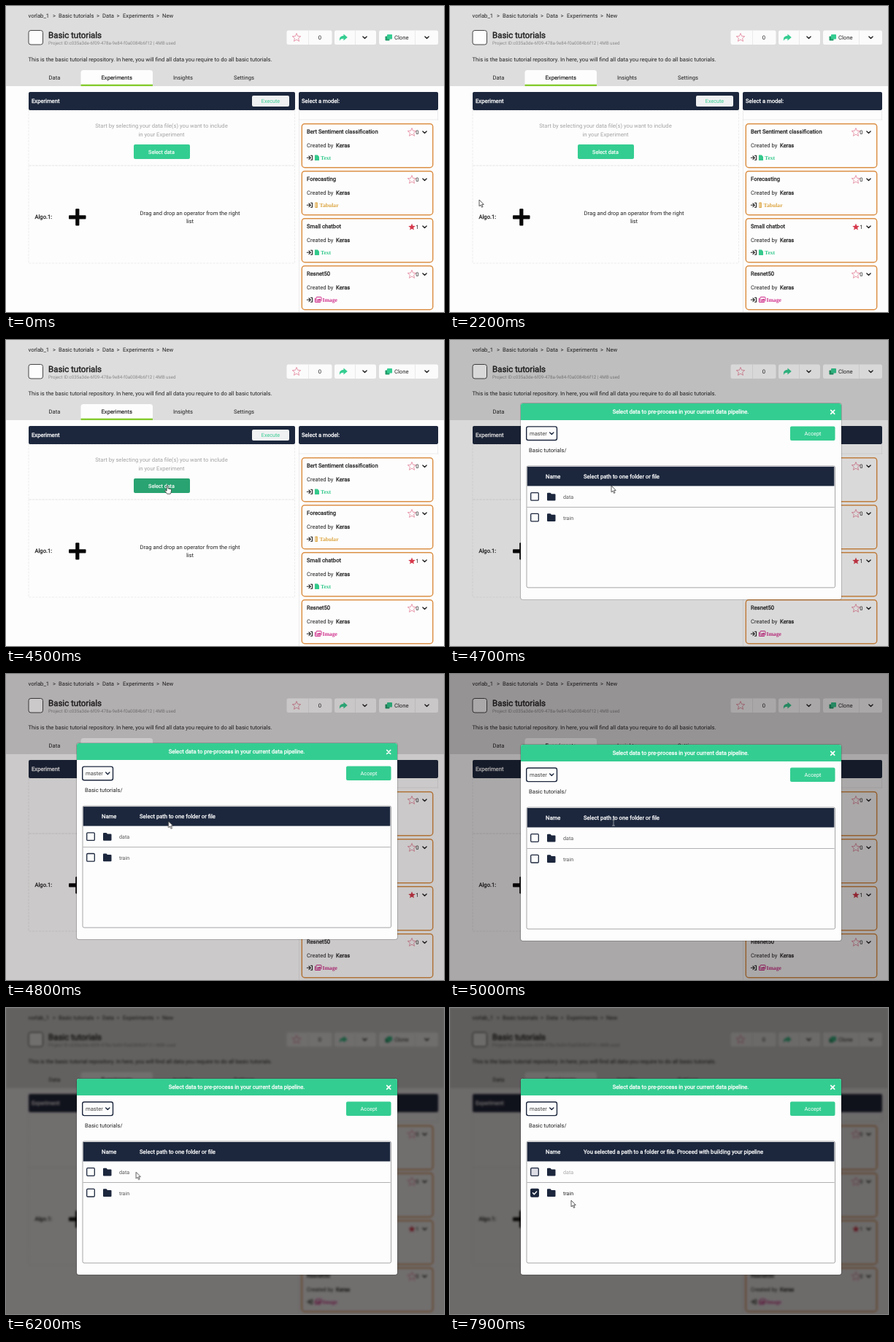
An HTML page for the animation above (8000 ms loop, 600 px wide and 420 px high).

```html
<!DOCTYPE html>
<html lang="en">
<head>
<meta charset="utf-8">
<title>Select data for an experiment</title>
<style>
  html, body { margin: 0; width: 100%; height: 100%; overflow: hidden; background: #fdfdfd; }
  svg { position: absolute; left: 0; top: 0; width: 600px; height: 420px; }
  text { font-family: Roboto, sans-serif; text-rendering: geometricPrecision; }
  .tag { font-family: "Liberation Serif", serif; font-weight: bold; }
  #page, #shade, #modal, #cursor, .slide, .glyph, .before, .after, #select {
    animation: 8s linear infinite;
  }
  #page { animation-name: soften; }
  #shade { animation-name: shade; }
  #modal { animation-name: fade; }
  .slide { animation-name: slide; }
  #select { animation-name: hover; }
  #cursor { animation-name: travel; }
  .glyph, .before, .after { animation-timing-function: step-end; }
  .arrow { animation-name: arrow; }
  .hand { animation-name: hand; }
  .beam { animation-name: beam; }
  .before { animation-name: before; }
  .after { animation-name: after; }

  @keyframes soften {
    0%, 61% { filter: blur(0); }
    65% { filter: blur(.4px); }
    73% { filter: blur(1.2px); }
    90%, 100% { filter: blur(1.7px); }
  }
  @keyframes shade {
    0%, 57% { opacity: 0; }
    58.75% { opacity: .14; }
    62.5% { opacity: .34; }
    65% { opacity: .43; }
    72.5% { opacity: .57; }
    100% { opacity: .59; }
  }
  @keyframes fade { 0%, 57% { opacity: 0; } 58.6%, 100% { opacity: 1; } }
  @keyframes slide {
    0%, 57.2% { transform: translateY(-26px); animation-timing-function: ease-out; }
    60.8%, 100% { transform: none; }
  }
  @keyframes hover { 0%, 35% { fill: #34cd91; } 38.5%, 100% { fill: #29a371; } }
  @keyframes travel {
    0%, 27.5% { transform: translate(40px, 266px); animation-timing-function: ease-in-out; }
    31.2%, 58.75% { transform: translate(221px, 200px); }
    61.25%, 73.75% { transform: translate(224px, 204px); animation-timing-function: ease-in-out; }
    82%, 88.75% { transform: translate(116px, 254px); animation-timing-function: ease-in-out; }
    96%, 100% { transform: translate(166px, 264px); }
  }
  @keyframes arrow {
    0% { visibility: hidden; }
    27.5% { visibility: visible; }
    30.6% { visibility: hidden; }
    57.3% { visibility: visible; }
    61.2% { visibility: hidden; }
    74% { visibility: visible; }
    81.4% { visibility: hidden; }
    89.6%, 100% { visibility: visible; }
  }
  @keyframes hand {
    0% { visibility: hidden; }
    30.6% { visibility: visible; }
    57.3% { visibility: hidden; }
    81.4% { visibility: visible; }
    89.6%, 100% { visibility: hidden; }
  }
  @keyframes beam {
    0% { visibility: hidden; }
    61.2% { visibility: visible; }
    74%, 100% { visibility: hidden; }
  }
  @keyframes before { 0% { visibility: visible; } 87.5%, 100% { visibility: hidden; } }
  @keyframes after { 0% { visibility: hidden; } 87.5%, 100% { visibility: visible; } }
</style>
</head>
<body>
<svg id="page" viewBox="0 0 600 420"></svg>
<svg id="over" viewBox="0 0 600 420"></svg>
<script>
const NAVY = '#1c273d', GREEN = '#34cd91', INK = '#222', BASE = 7.65;

const rect = (x, y, w, h, fill, r = 0, extra = '') =>
  `<rect x="${x}" y="${y}" width="${w}" height="${h}" rx="${r}" fill="${fill}" ${extra}/>`;
const path = (d, fill, extra = '') => `<path d="${d}" fill="${fill}" ${extra}/>`;
const line = (d, color, width) =>
  path(d, 'none', `stroke="${color}" stroke-width="${width}" stroke-linecap="round" stroke-linejoin="round"`);

// y is the middle of the capitals
function text(x, y, str, { size = BASE, color = INK, bold = 0, anchor = 'start', cls = '' } = {}) {
  const weight = bold ? `stroke="${color}" stroke-width="${bold}"` : '';
  return `<text x="${x}" y="${(y + size * .355).toFixed(2)}" font-size="${size}" fill="${color}" ` +
    `text-anchor="${anchor}" class="${cls}" ${weight}>${str}</text>`;
}
const bold = (x, y, str, color = INK, more = {}) => text(x, y, str, { color, bold: .3, ...more });
const chevron = (x, y, color = INK) => line(`M${x - 2.6} ${y - 1.3}l2.6 2.6l2.6 -2.6`, color, 1.4);

function star(x, y, r, full) {
  const points = Array.from({ length: 10 }, (_, i) => {
    const a = Math.PI * (i / 5 - .5), d = i % 2 ? r * .45 : r;
    return `${(x + d * Math.cos(a)).toFixed(2)} ${(y + d * Math.sin(a)).toFixed(2)}`;
  });
  const d = `M${points.join('L')}Z`;
  return full ? path(d, '#d63a4c') : path(d, 'none', 'stroke="#e27f97" stroke-width=".8" stroke-linejoin="round"');
}

function header() {
  const crumbs = [[30.5, 'vorlab_1'], [64, '&gt;'], [72, 'Basic tutorials'], [124, '&gt;'], [132, 'Data'],
    [151.5, '&gt;'], [160, 'Experiments'], [206, '&gt;'], [214, 'New']];
  const tabs = [[58.5, 'Data'], [229, 'Insights'], [312, 'Settings']];
  return rect(0, 0, 600, 110, '#dddddd') +
    crumbs.map(([x, s]) => text(x, 13.3, s)).join('') +
    rect(31, 33.5, 19.5, 19.5, '#fdfdfd', 3, 'stroke="#333" stroke-width=".9"') +
    bold(58, 40.3, 'Basic tutorials', INK, { size: 11.5, bold: .45 }) +
    text(58, 51, 'Project ID:c035a3de-6f09-478a-9e84-f0a0084b6f12 | 4MB used', { size: 6.22, color: '#888' }) +
    text(30.5, 73.3, 'This is the basic tutorial repository. In here, you will find all data you require to do all basic tutorials.') +
    [[384.5, 62, 414], [450, 57, 478], [511, 81, 560]].map(([x, w, cut]) =>
      rect(x, 33.5, w, 19.5, '#fbfbfb', 2.5) + rect(cut, 33.5, .8, 19.5, '#e6e6e6')).join('') +
    star(398, 43.5, 6, false) + text(430, 43.3, '0', { anchor: 'middle' }) +
    path('M457 48c-.6-5 1.4-7 5.4-7v-2.4l5.4 4.4l-5.4 4.4v-2.7c-3.2 0-4.6 .8-5.4 3.3z', GREEN) + chevron(491.5, 43.3) +
    rect(519.5, 41.5, 6, 6, '#229b6a', .8) + rect(522, 39, 7, 6.5, GREEN, .8) +
    text(532, 43.3, 'Clone') + chevron(576.5, 43.3) +
    path('M102.500 110V91.500q0-3.500 3.500-3.500h91.500q3.500 0 3.500 3.500V110z', '#fdfdfd') +
    rect(102.5, 107.6, 98.5, 2.4, '#86cb2f') +
    bold(130.5, 97.8, 'Experiments', INK, { bold: .18 }) +
    tabs.map(([x, s]) => text(x, 98.3, s)).join('');
}

function experiment() {
  const dashed = 'stroke="#e9e9ea" stroke-width=".8" stroke-dasharray="3 1.500"';
  const grey = { anchor: 'middle', color: '#a3a3a3' };
  const mid = { anchor: 'middle' };
  return rect(31, 143, 364.5, 76, 'none', 0, dashed) + rect(31, 219, 364.5, 134, 'none', 0, dashed) +
    rect(31, 118, 365, 25, NAVY, 2) + bold(35, 130.3, 'Experiment', '#fff') +
    rect(337, 123, 51, 15, '#eff1f2', 2) + text(362.5, 130.5, 'Execute', { size: 7.2, color: GREEN, anchor: 'middle' }) +
    text(213, 164.6, 'Start by selecting your data file(s) you want to include', grey) +
    text(213, 176, 'in your Experiment', grey) +
    rect(175, 190, 77, 20, GREEN, 2, 'id="select"') +
    bold(213, 200, 'Select data', '#fff', { size: 7.2, anchor: 'middle', bold: .2 }) +
    bold(39.5, 289.6, 'Algo.1:') +
    rect(86, 287.3, 23.5, 5.2, '#080808', 1) + rect(95.2, 278.3, 5.2, 23.3, '#080808', 1) +
    text(252, 284, 'Drag and drop an operator from the right', mid) + text(252, 295.6, 'list', mid);
}

const tags = {
  Text: { color: '#34c98c', x: 431, icon: path('M423 204.500h3.800l2.200 2.200v5.300h-6z', '#34c98c') },
  Tabular: {
    color: '#dca540', x: 429.5,
    icon: rect(423.4, 204.5, 3.4, 7.5, '#dca540', .5) + rect(424.5, 205.5, .8, 5.5, '#fff')
  },
  Image: {
    color: '#cf2f8b', x: 433.5,
    icon: line('M423.500 206.500v5h7', '#cf2f8b', 1) + rect(425, 204.5, 7, 5.5, 'none', .6, 'stroke="#cf2f8b"') +
      path('M426 209l1.500-2l1 1l1.300-1.800l1.700 2.800z', '#cf2f8b')
  }
};

function card([name, kind, liked], i) {
  const tag = tags[kind];
  return `<g transform="translate(0 ${i * 65})">` +
    rect(405.3, 161.7, 179.4, 60, '#fdfdfd', 4, 'stroke="#dc9148" stroke-width="1.500"') +
    bold(412, 172, name, INK, { bold: .28 }) +
    star(556, 173.5, liked ? 5 : 6, liked) + text(561.3, 173.2, liked ? 1 : 0) + chevron(573.5, 173.2) +
    text(412, 191, 'Created by') + bold(452, 191, 'Keras') +
    line('M412.300 208.300h4.500M415 206l2.300 2.300l-2.300 2.300M417.500 205.300h2v6h-2', INK, 1.1) +
    tag.icon + text(tag.x, 208.5, kind, { color: tag.color, cls: 'tag' }) + '</g>';
}

function models() {
  const list = [['Bert Sentiment classification', 'Text', false], ['Forecasting', 'Tabular', false],
    ['Small chatbot', 'Text', true], ['Resnet50', 'Image', false]];
  return rect(401, 118, 191, 25, NAVY, 2) + bold(405, 130.3, 'Select a model:', '#fff') +
    line('M401.500 143V420M591.500 143V156M401 156H592', '#e8e8ea', .8) + list.map(card).join('');
}

const box = (y, fill) => rect(110.7, y - 5.3, 10.6, 10.6, fill, 1.2, `stroke="${NAVY}" stroke-width="1.300"`);
const folder = y => path(`M133 ${y - 4.5}q0-1 1-1h3.500l1.500 1.600h4.500q1 0 1 1v7.200q0 1-1 1h-9.500q-1 0-1-1z`, NAVY);
const label = (y, s, color) => text(155, y + .3, s, { size: 7.15, color });
const group = (cls, ...parts) => `<g class="${cls}">${parts.join('')}</g>`;

function modal() {
  return '<g id="modal">' + group('slide',
    rect(96, 96, 441, 271, '#000', 4, 'opacity=".18"'),
    rect(97, 97, 439, 269, '#fdfdfd', 3),
    path('M97 120V100q0-3 3-3h433q3 0 3 3v20z', GREEN),
    bold(316, 108.5, 'Select data to pre-process in your current data pipeline.', '#fff', { anchor: 'middle' }),
    line('M521.700 106.400l5 5M526.700 106.400l-5 5', '#fff', 1.7),
    rect(104.7, 129, 41.8, 18.6, '#fdfdfd', 2.5, `stroke="${NAVY}" stroke-width="1.400"`),
    text(109, 138.6, 'master', { color: '#444' }), chevron(139.3, 138.3, NAVY),
    rect(466, 128.5, 61.5, 19.5, GREEN, 2),
    text(497, 138.5, 'Accept', { size: 7.3, color: '#fff', anchor: 'middle' }),
    text(108, 161.3, 'Basic tutorials/'),
    rect(105, 183, 422.5, 167, '#fdfdfd', 2, 'stroke="#9b9b9f" stroke-width=".9"'),
    rect(105.8, 184, 420.5, 26.5, NAVY),
    bold(131, 197.3, 'Name', '#fff'),
    rect(105.5, 239.1, 421, .9, '#a9a9ad'),
    folder(225.3), folder(253.8),
    group('before',
      bold(183, 197.3, 'Select path to one folder or file', '#fff'),
      box(225, '#fdfdfd'), box(253.7, '#fdfdfd'), label(225.3, 'data', '#555'), label(253.8, 'train', '#555')),
    group('after',
      bold(183, 197.3, 'You selected a path to a folder or file. Proceed with building your pipeline', '#fff'),
      box(225, '#dddde6'), box(253.7, NAVY), line('M113.500 253.800l1.800 1.900l3.400-3.700', '#fff', 1.4),
      label(225.3, 'data', '#aaa'), label(253.8, 'train', INK))) + '</g>';
}

function cursor() {
  const edge = 'stroke="#333" stroke-width=".8" stroke-linejoin="round"';
  return '<g id="cursor">' +
    group('glyph arrow', path('M0 0v8.800l2-1.800l1.500 3.300l1.500-.7l-1.500-3.200h2.700z', '#fff', edge)) +
    group('glyph hand', path('M-.9 0q.9-1.200 1.800 0v3.800l3.800 .9q1 .3 .9 1.400l-.6 3.400l-.8 1.700h-4.500l-3.200-4.200q.4-1.400 2.600 .2z', '#fff', edge)) +
    group('glyph beam', line('M-1.500 -4h3M0 -4v8M-1.500 4h3', '#a9adb5', .8)) + '</g>';
}

document.getElementById('page').innerHTML = rect(0, 0, 600, 420, '#fdfdfd') + header() + experiment() + models();
document.getElementById('over').innerHTML = rect(0, 0, 600, 420, '#0a0404', 0, 'id="shade"') + modal() + cursor();
</script>
</body>
</html>
```
